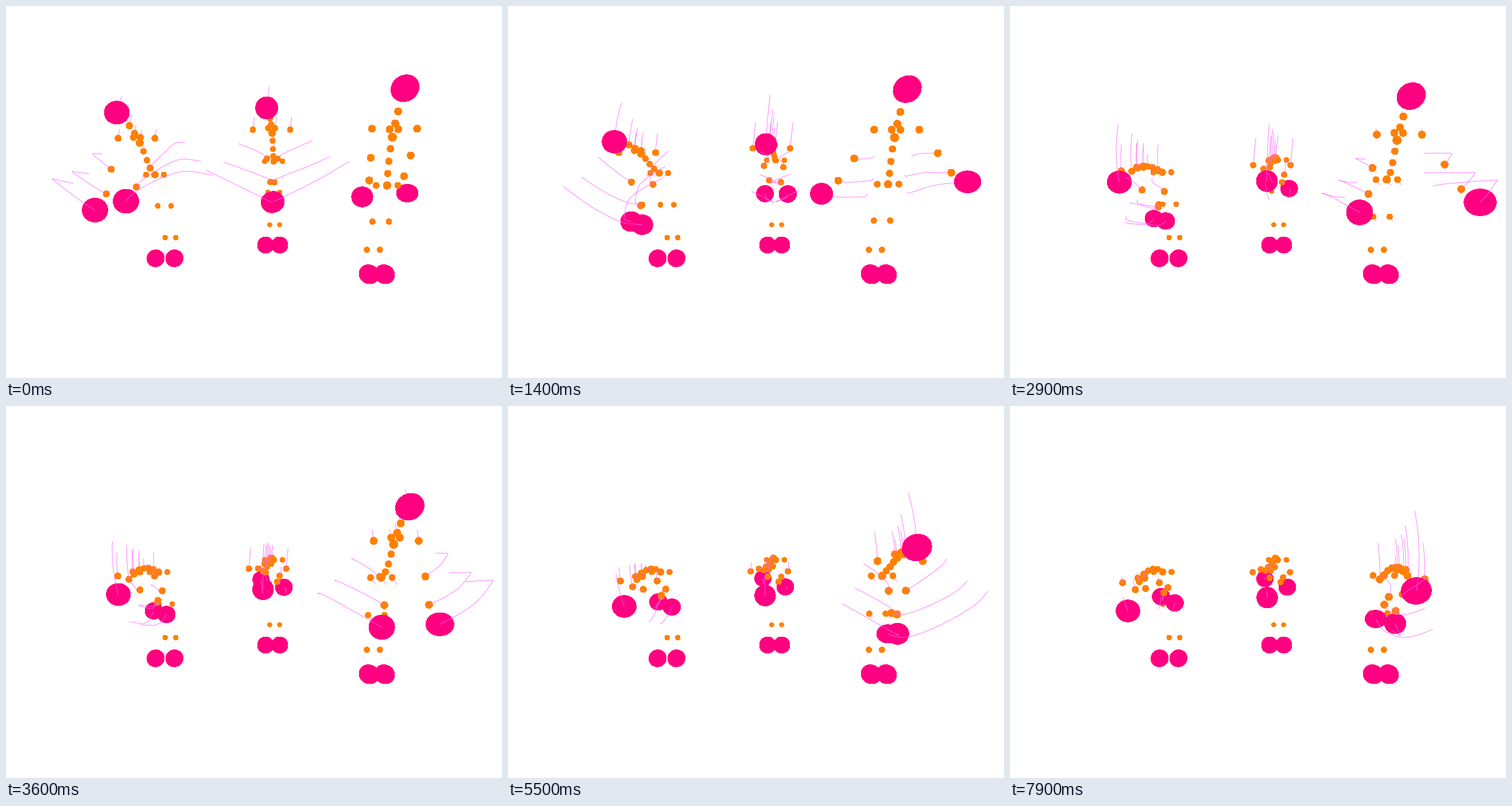
Recreate the animation shown at these times as a matplotlib script. Size 864 by 648 pixels, loop 8 s.

```python
import numpy as np
import matplotlib.pyplot as plt
from matplotlib.animation import FuncAnimation
from matplotlib.patches import Ellipse

W, H, DPI = 864, 648, 100
ORANGE, PINK, TRAIL = "#ff8000", "#ff0080", "#ff66ff"
TAIL, SUB, LAST = 13, 4, 35      # trail length in steps, samples per step
TIME = np.arange(-TAIL * SUB, LAST * SUB + 1) / SUB

# tenths of a second at which the pose advances: quick steps, then slow ones
STEPS = ([0] + [(195 + 172 * k) // 100 for k in range(24)]
         + [(450 + 34 * k) // 10 for k in range(11)])

# places along the spine, pelvis to head, and the dot size at each
SPINE = [(0, 6.3), (.13, 5.5), (.26, 5.5), (.39, 5.6), (.51, 6.9), (.65, 6.1)]
NECK, COLLAR, SHOULDER = .77, .59, .60

fig = plt.figure(figsize=(W / DPI, H / DPI), dpi=DPI, facecolor="white")
ax = fig.add_axes([0, 0, 1, 1])
ax.set_xlim(0, W)
ax.set_ylim(H, 0)
ax.axis("off")
joints = []


def mix(a, b, e):
    return np.asarray(a, float) + np.subtract(b, a) * e[:, None]


def bezier(pts, s):
    a, b, c = np.array(pts, float)
    return a * (1 - s) ** 2 + 2 * b * s * (1 - s) + c * s * s


def smooth(k, v):
    """Monotone cubic through the key values, sampled on TIME."""
    h = np.diff(k)
    d = np.diff(v) / h
    a, b = d[:-1], d[1:]
    turn = a * b <= 0
    inner = np.where(turn, 0, 2 * a * b / np.where(turn, 1, a + b))
    m = np.concatenate([d[:1], inner, d[-1:]])
    t = np.clip(TIME, k[0], k[-1])
    i = np.clip(np.searchsorted(k, t, "right") - 1, 0, len(h) - 1)
    u = (t - k[i]) / h[i]
    return (v[i] * (1 + 2 * u) * (1 - u) ** 2 + h[i] * m[i] * u * (1 - u) ** 2
            + v[i + 1] * u * u * (3 - 2 * u) + h[i] * m[i + 1] * u * u * (u - 1))


def path(*keys):
    t, x, y = np.array(keys, float).T
    return np.column_stack([smooth(t, x), smooth(t, y)])


class Joint:
    def __init__(self, pos, r, color=ORANGE, ratio=1, tilt=0, z=3, over=99, rise=99):
        self.pos, self.ratio, self.z = pos, ratio, z
        self.over, self.rise = over, rise
        self.r = np.broadcast_to(r, TIME.shape)
        self.tilt = np.broadcast_to(tilt, TIME.shape)
        self.spot = ax.add_patch(Ellipse((0, 0), 1, 1, fc=color, lw=0,
                                         antialiased=False))
        self.line, = ax.plot([], [], color=TRAIL, lw=0.6)
        joints.append(self)

    def pose(self, step):
        i = (step + TAIL) * SUB
        r = self.r[i]
        self.spot.set_center(self.pos[i])
        self.spot.set_width(2 * r - 1)      # unsmoothed fills gain half a pixel
        self.spot.set_height(2 * r * self.ratio - 1)
        self.spot.set_angle(self.tilt[i])
        self.spot.set_zorder(5 if step >= self.rise else self.z)
        self.line.set_data(*self.pos[i - TAIL * SUB:i + 1].T)
        self.line.set_zorder(6 if step >= self.over else 0.5)


class Dancer:
    """A figure bowing from one spine curve to another."""

    def __init__(self, mid, rate, up, down, arc, size, front):
        self.mid, self.rate, self.arc = mid, rate, arc
        self.up, self.down = up, down
        self.size, self.front = size, front

    def ease(self, lead=0):
        return 1 / (1 + np.exp(-self.rate * (TIME - self.mid + lead)))

    def spine(self, s):
        e = self.ease(13 * (1 - s) ** 3)     # the pelvis moves first
        p = mix(bezier(self.up, s), bezier(self.down, s), e)
        p[:, 0] += 4 * self.arc * s ** 3 * e * (1 - e)
        return p

    def dot(self, pos, r, **kw):
        Joint(pos, r * self.size, **{"over": self.front, **kw})

    def pair(self, pos, half, r, **kw):
        for side in (-half, half):
            self.dot(pos + [side, 0], r, **kw)

    def legs(self, knees, ankles, feet, halves, foot, **shape):
        still = np.zeros(TIME.size)
        self.pair(mix(*knees, self.ease(13)), halves[0], 4.8, z=1)
        self.pair(mix(ankles, ankles, still), halves[1], 4.7, z=1)
        for side in (-halves[2], halves[2]):
            Joint(mix(feet, feet, still) + [side, 0], foot, PINK, z=2, **shape)

    def body(self, hip, collar):
        self.pair(self.spine(0), hip, 5.2)
        for s, r in SPINE:
            self.dot(self.spine(s), r)
        self.pair(self.spine(COLLAR), collar, 6)
        self.dot(self.spine(NECK), 6.1, rise=self.front + 2)

    def head(self, r, ratio, tilt=0):
        e = self.ease()
        Joint(self.spine(1), r[0] + (r[1] - r[0]) * e, PINK, ratio,
              tilt * (1 - e), z=4, over=self.front)

    def arm(self, side, sag, hand, bend, size, ratio, over=0):
        """size: resting radius, swell, step of the swell and its width."""
        top = self.spine(SHOULDER) + [side, 0]
        top[:, 1] += sag * np.sqrt(self.ease())
        reach = hand - top
        across = np.column_stack([reach[:, 1], -reach[:, 0]])
        across /= np.hypot(*reach.T)[:, None]
        self.dot(top, 6)
        for part, b in zip((.42, .75), bend):
            self.dot(top + reach * part + across * b, 6, over=over)
        r, swell, when, width = size
        r = r + swell * np.exp(-((TIME - when) / width) ** 2)
        Joint(hand, r, PINK, ratio, z=2, over=over)


left = Dancer(10.5, .16, [(250, 301), (244, 226), (203, 153)],
              [(266, 289), (232, 263), (207, 361)], -20, 1, 15)
left.legs([(273, 353), (278, 345)], (286.5, 403.3), (277, 439.5),
          (11.7, 9.3, 16.4), 15.7, ratio=.97, tilt=-20)
left.body(15.5, 6)
left.arm(-32, 7, path((-13, 117, 309), (-8, 80, 301), (0, 155, 355.5), (5, 209, 379),
                      (12, 257, 382), (25, 284, 354), (35, 287, 343)),
         (5, 10), (15.8, 7, 0, 9), .94)
left.arm(32, 7, path((-13, 360, 295), (-8, 314, 288), (0, 209, 340), (5, 202, 370),
                     (12, 239, 379), (25, 261, 346), (35, 263, 332)),
         (14, 6), (15.8, 7, 0, 9), .94)
left.head((22.5, 21.3), .92)

middle = Dancer(7.4, .18, [(467, 277), (470, 202), (459, 136)],
                [(466, 268), (457, 247), (448, 335)], -4, .91, 11)
middle.legs([(468, 328), (466, 323)], (468, 381), (464.5, 416.3),
            (10.5, 8.7, 12.3), 14.7)
middle.body(15.5, 5.8)
middle.arm(-32.5, 8, path((-13, 349, 286), (-8, 392, 307), (0, 463, 342), (5, 450, 335),
                          (12, 446, 316), (25, 444, 300), (35, 444, 301)),
           (11, 13), (14.9, 4.4, -1, 6), .97)
middle.arm(32.5, 8, path((-13, 598, 271), (-8, 543, 303), (0, 466, 341), (5, 486, 333),
                         (12, 488, 321.5), (25, 483, 315), (35, 483, 315.5)),
           (-10, -13), (15.3, 4, -1, 6), .97)
middle.head((20.2, 18.6), 1)

right = Dancer(28.4, .235, [(664, 313), (666, 232), (695, 143)],
               [(651, 295), (678, 253), (700, 360)], 15, 1.12, 34)
right.legs([(653, 376), (643, 361)], (640, 424.7), (646, 467.3),
           (14.3, 11.3, 13.5), 18.2, ratio=.92, tilt=30)
right.body(18.8, 7.5)
right.arm(-38.5, 18, path((-8, 628, 324), (0, 620.5, 332.5), (5, 573, 333), (9, 543, 326),
                          (12, 550, 328), (17, 609, 359.5), (25, 680, 400), (35, 671, 379)),
          (5, 8), (19, 4.5, 18, 8), .95, 16)
right.arm(40, 18, path((-8, 693, 324), (0, 699, 326), (5, 750, 311), (12, 849, 303),
                       (17, 819, 342), (25, 689, 403), (30, 650, 390), (35, 637, 371)),
          (-4, -10), (19, 10.3, 15, 8), .83, 16)
right.head((26, 27.2), .88, -35)


def draw(frame):
    step = int(np.searchsorted(STEPS, frame, "right")) - 1
    for j in joints:
        j.pose(step)
    return []


anim = FuncAnimation(fig, draw, frames=80, interval=100, repeat=True,
                     init_func=lambda: draw(0), cache_frame_data=False)
plt.show()
```
